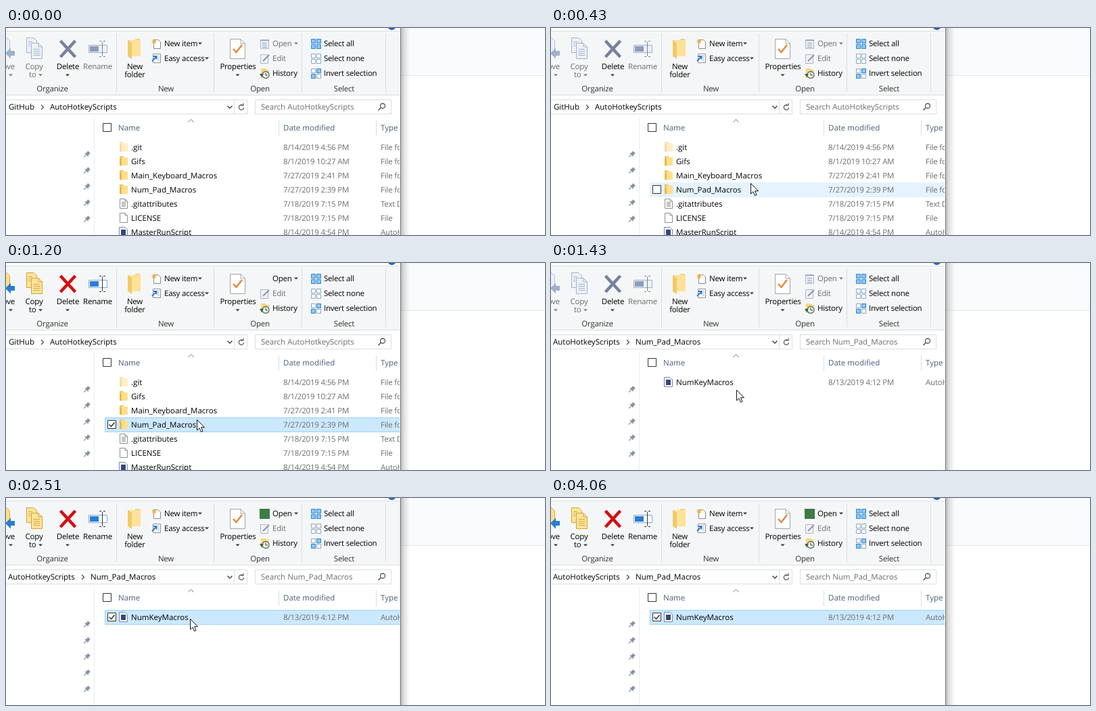
An HTML page that plays this animation: 797x307 px, repeating every 4130 ms.

```html
<!DOCTYPE html>
<html lang="en">
<head>
<meta charset="utf-8">
<title>File window</title>
<style>
  html, body { margin: 0; width: 100%; height: 100%; overflow: hidden; background: #fff; }
  svg { display: block; width: 797px; height: 307px; }
  text { font: 11.5px "Open Sans", "Noto Sans", sans-serif; text-rendering: geometricPrecision; fill: #000; white-space: pre; }
  .ribbon text { letter-spacing: -.22px; }
  .ribbon .mid { text-anchor: middle; }
  .ribbon .dim, .ribbon .off text { fill: #6d6d6d; }
  .ribbon .group { text-anchor: middle; fill: #333; }
  .head text { fill: #4a6079; }
  .list .info, .hint { fill: #6d6d6d; }
  .list .info { letter-spacing: -.2px; }
  .line { fill: none; stroke: #dcdddf; }

  .cursor, .mark, .tick, .click, .first, .second, .on, .off, .edge, .script {
    animation: 4130ms step-end infinite;
  }
  .cursor { animation-name: cursor; }
  .mark { animation-name: mark; }
  .tick { animation-name: tick; }
  .click { animation-name: click; }
  .first { animation-name: first; }
  .second { animation-name: second; }
  .on { animation-name: on; }
  .off { animation-name: off; }
  .script { animation-name: script; }
  .edge { animation-name: edge; }

  @keyframes cursor {
    0% { transform: translate(850px, 350px); }
    1.69% { transform: translate(629px, 293px); }
    3.38% { transform: translate(562px, 260px); }
    5.32% { transform: translate(474px, 232px); }
    7.02% { transform: translate(392px, 214px); }
    8.71% { transform: translate(330px, 219px); }
    10.41% { transform: translate(295px, 230px); }
    12.34% { transform: translate(287px, 235px); }
    14.28% { transform: translate(283px, 237px); }
    28.81% { transform: translate(282px, 232px); }
    30.75% { transform: translate(280px, 221px); }
    32.68% { transform: translate(277px, 205px); }
    34.62% { transform: translate(274px, 188px); }
    36.56% { transform: translate(272px, 179px); }
    69.97% { transform: translate(304px, 189px); }
    71.67% { transform: translate(462px, 228px); }
    73.6% { transform: translate(696px, 287px); }
    75.54%, 100% { transform: translate(850px, 350px); }
  }
  @keyframes mark {
    0% { opacity: 0; transform: translateY(84px); fill: #e5f3ff; stroke: #e5f3ff; }
    3.38% { opacity: 1; transform: translateY(84px); fill: #e5f3ff; stroke: #e5f3ff; }
    5.32% { opacity: 1; transform: translateY(63px); fill: #e5f3ff; stroke: #e5f3ff; }
    7.02% { opacity: 1; transform: translateY(42px); fill: #e5f3ff; stroke: #e5f3ff; }
    10.41% { opacity: 1; transform: translateY(63px); fill: #e5f3ff; stroke: #e5f3ff; }
    21.54% { opacity: 1; transform: translateY(63px); fill: #cce8ff; stroke: #99d1ff; }
    30.75% { opacity: 0; transform: none; fill: #e5f3ff; stroke: #e5f3ff; }
    36.56% { opacity: 1; transform: none; fill: #e5f3ff; stroke: #e5f3ff; }
    47.69% { opacity: 1; transform: none; fill: #cce8ff; stroke: #99d1ff; }
    71.67% { opacity: 1; transform: none; fill: #d9d9d9; stroke: #d9d9d9; }
    98.3%, 100% { opacity: 1; transform: none; fill: #cce8ff; stroke: #99d1ff; }
  }
  @keyframes tick {
    0%, 30.75% { opacity: 0; }
    21.54%, 47.69%, 100% { opacity: 1; }
  }
  @keyframes click {
    0%, 23.24%, 27.11%, 51.33%, 58.83%, 100% { opacity: 0; }
    21.54%, 25.66%, 47.69%, 55.2% { opacity: .82; }
  }
  @keyframes first { 0% { opacity: 1; } 30.75%, 100% { opacity: 0; } }
  @keyframes second { 0% { opacity: 0; } 30.75%, 100% { opacity: 1; } }
  @keyframes on { 0%, 30.75% { opacity: 0; } 27.11%, 49.39%, 100% { opacity: 1; } }
  @keyframes off { 0%, 30.75% { opacity: 1; } 27.11%, 49.39%, 100% { opacity: 0; } }
  @keyframes script { 0% { opacity: 0; } 49.39%, 100% { opacity: 1; } }
  @keyframes edge { 0%, 98.3%, 100% { stroke: #f4f4f4; } 60.77% { stroke: #e0e0e0; } }
</style>
</head>
<body>
<svg viewBox="0 0 797 307" xmlns="http://www.w3.org/2000/svg">
  <defs>
    <clipPath id="win"><path d="M0 0H582V307H0z"/></clipPath>
    <linearGradient id="shade">
      <stop offset="0" stop-color="#000" stop-opacity=".28"/>
      <stop offset=".4" stop-color="#000" stop-opacity=".12"/>
      <stop offset="1" stop-color="#000" stop-opacity="0"/>
    </linearGradient>
    <path id="caret" d="M-3-1.5H3L0 1.5z"/>
    <path id="chev" d="M-2-3.5L1.5 0L-2 3.5" fill="none" stroke="#444" stroke-width="1.2"/>
    <g id="folder">
      <path d="M1 0H6L7.5 2H12V14H1z" fill="#f0c75e"/>
      <path d="M3 2H13V14H3z" fill="#ffdf8c"/>
      <path d="M1 2.5L4 4V15L1 13.5z" fill="#e9b949"/>
    </g>
    <path id="page" d="M1.5.5H9L12.5 4V14.5H1.5zM9 .5V4H12.5" fill="#fff" stroke="#8b8f94"/>
    <g id="code">
      <path d="M.5.5H9L12.5 4V14.5H.5z" fill="#fff" stroke="#7085ab"/>
      <path d="M3 4H10V12H3z" fill="#34487f"/>
    </g>
    <g id="pin" fill="#8591a3">
      <path d="M1-5L5-1L3.8-.6L1.8 1.5L1.7 4L-3.8-1.6L-1.3-1.7L.7-3.8z"/>
      <path d="M-1.5 1L-4.7 4.7" stroke="#8591a3" stroke-width="1.2"/>
    </g>
    <g id="pages">
      <path d="M.5.5H11L15.5 5V22.5H.5z"/>
      <path d="M7.5 8.5H18L23.5 14V31.5H7.5z"/>
      <path d="M18 8.5V14H23.5M10.5 17.5H20M10.5 20.5H20.5M10.5 23.5H20.5M10.5 26.5H20.5M3 6.5H9M3 9.5H6M3 12.5H6" fill="none"/>
    </g>
    <path id="cross" d="M-11-12L11 12M11-12L-11 12" fill="none" stroke-width="4.6"/>
    <path id="sheet" d="M-8 14.5H1L5.5 19V38.5H-8z"/>
    <path id="arrow" d="M-1 37.5L7 29.5V34H13V41H7V45.5z"/>
    <path id="beam" d="M138 19.500H141M144 19.500H147M138 42.500H141M144 42.500H147M142.500 20.500V41.500" fill="none"/>
    <path id="grid" d="M.5.5H6.5V6.5H.5zM8.5.5H14.5V6.5H8.5zM.5 8.5H6.5V14.5H.5zM8.5 8.5H14.5V14.5H8.5z"/>
    <path id="box" d="M.5.5H12.5V12.5H.5z" fill="#fff" stroke="#333"/>
  </defs>

  <!-- page behind the window -->
  <path d="M0 0H797V307H0z" fill="#fff"/>
  <path d="M583 0H797V70H583z" fill="#fafbfc"/>
  <path d="M583 70.5H797" stroke="#e5e7ea"/>
  <path d="M583 0H597V307H583z" fill="url(#shade)"/>

  <g clip-path="url(#win)">
    <path d="M0 0H583V307H0z" fill="#fff"/>

    <g class="ribbon">
      <path d="M0 4H583V99H0z" fill="#f5f6f7"/>
      <path class="line" d="M0 4.5H583M0 99.5H583M163.5 8V95M307.5 8V95M437.5 8V95M561.5 8V95"/>
      <circle cx="570.5" cy="-3" r="6" fill="#2466b5"/>

      <text x="68.5" y="94" class="group">Organize</text>
      <text x="236.5" y="94" class="group">New</text>
      <text x="375.5" y="94" class="group">Open</text>
      <text x="500" y="94" class="group">Select</text>

      <g class="off">
        <use href="#sheet" fill="#edf1f7" stroke="#b3c0d6"/>
        <use href="#arrow" fill="#9fb0cd"/>
        <use href="#pages" x="30" y="14" fill="#edf1f7" stroke="#a3b2cc"/>
        <use href="#cross" x="91.5" y="31" stroke="#76829f"/>
        <path d="M122.500 25.500H149.500V36.500H122.500z" fill="#eef0f4" stroke="#9fb0cd"/>
        <path d="M124 27H137V35H124z" fill="#8c9dbd"/>
        <use href="#beam" stroke="#76829f"/>
        <text x="13" y="61" text-anchor="end">Move</text>
        <text x="41.5" y="61" class="mid">Copy</text>
        <text x="34" y="73">to</text>
        <text x="135.5" y="61" class="mid">Rename</text>
        <use href="#caret" x="7" y="70" fill="#777"/>
        <use href="#caret" x="51" y="70" fill="#777"/>
      </g>
      <g class="on">
        <use href="#sheet" fill="#ffe08a" stroke="#d8ab43"/>
        <use href="#arrow" fill="#2b7cd3"/>
        <use href="#pages" x="30" y="14" fill="#ffe59a" stroke="#cfa23c"/>
        <use href="#cross" x="91.5" y="31" stroke="#d20f14"/>
        <path d="M122.500 25.500H149.500V36.500H122.500z" fill="#fff" stroke="#7fa9d6"/>
        <path d="M124 27H137V35H124z" fill="#2b7cd3"/>
        <use href="#beam" stroke="#333"/>
        <text x="13" y="61" text-anchor="end">Move</text>
        <text x="41.5" y="61" class="mid">Copy</text>
        <text x="34" y="73">to</text>
        <text x="135.5" y="61" class="mid">Rename</text>
        <use href="#caret" x="7" y="70" fill="#333"/>
        <use href="#caret" x="51" y="70" fill="#333"/>
      </g>
      <text x="91.5" y="61" class="mid">Delete</text>
      <use href="#caret" x="91" y="70" fill="#333"/>

      <path d="M180 18H190L192 16H198V42H180z" fill="#f3d27b"/>
      <path d="M182 18H199V42H182z" fill="#ffe299"/>
      <path d="M180 18L186 22V46L180 42z" fill="#f0ca68"/>
      <text x="190.5" y="61" class="mid">New</text>
      <text x="190.5" y="73" class="mid">folder</text>
      <path d="M218.5 17.5H225L228.5 21V30.5H218.5z" fill="#fff" stroke="#888"/>
      <path d="M215.500 20H222.500M219 16.500V23.500M216.500 17.500L221.500 22.500M221.500 17.500L216.500 22.500" stroke="#eeb13c" stroke-width="1.200"/>
      <text x="234" y="27">New item</text>
      <use href="#caret" x="287" y="23" fill="#333"/>
      <path d="M217.5 38.5H228.5V51.5H217.5z" fill="#fff" stroke="#8b9199"/>
      <path d="M223 41.500H227M224 44.500H227M224 47.500H227" stroke="#a3abb5"/>
      <path d="M216 49L222 43M218 42H222.5V46.5" stroke="#2379c9" stroke-width="1.8" fill="none"/>
      <text x="234" y="49">Easy access</text>
      <use href="#caret" x="297" y="45" fill="#333"/>

      <path d="M331.5 16.5H347L353.5 23V45.5H331.5z" fill="#fff" stroke="#a0a4a9"/>
      <path d="M347 16.5V23H353.5" fill="none" stroke="#a0a4a9"/>
      <path d="M336 31L340.5 36L349 25" fill="none" stroke="#ea8434" stroke-width="2.4"/>
      <text x="343" y="61" class="mid">Properties</text>
      <use href="#caret" x="342.5" y="70" fill="#333"/>

      <g class="off">
        <path d="M376.5 17.5H388.5V30.5H376.5z" fill="#eef1f6" stroke="#a9b6cc"/>
        <path d="M376 18.500H389M379 22.500H386M379 25.500H386M379 28.500H386" stroke="#8c9dbd"/>
        <text x="394" y="27">Open</text>
        <use href="#caret" x="429" y="23" fill="#777"/>
      </g>
      <g class="on">
        <text x="394" y="27">Open</text>
        <use href="#caret" x="429" y="23" fill="#333"/>
      </g>
      <path class="script" d="M375 16H390V31H375z" fill="#3c7c45"/>
      <path d="M376.5 39.5H387.5V52.5H376.5z" fill="#f1f2f5" stroke="#a9b6cc"/>
      <path d="M380 49L389 40" stroke="#8793ab" stroke-width="2"/>
      <text x="394" y="49" class="dim">Edit</text>
      <path d="M377 60H384L386 62H389V74H377z" fill="#f5d87f"/>
      <circle cx="384" cy="69.5" r="5" fill="#f4f6f4" stroke="#5d6b60" stroke-width="1.3"/>
      <path d="M384 66.500V70H387" fill="none" stroke="#333"/>
      <path d="M375 68L381 68L378 73z" fill="#2f6b34"/>
      <text x="394" y="71">History</text>

      <use href="#grid" x="451" y="16" fill="#8ec7f3" stroke="#2f86cf"/>
      <use href="#grid" x="451" y="38" fill="#fff" stroke="#8aa6c2"/>
      <use href="#grid" x="451" y="60" fill="#fff" stroke="#8aa6c2"/>
      <path d="M459.5 60.5H465.5V66.5H459.5zM451.5 68.5H457.5V74.5H451.5z" fill="#8ec7f3" stroke="#2f86cf"/>
      <text x="470" y="27">Select all</text>
      <text x="470" y="49">Select none</text>
      <text x="470" y="71">Invert selection</text>
    </g>

    <!-- address and search -->
    <path class="line" d="M-1 106.5H356.5V127.5H-1M337.5 107V127M368.5 106.5H569.5V127.5H368.5z"/>
    <path d="M327.5 115.5L331 119L334.5 115.5" fill="none" stroke="#444" stroke-width="1.5"/>
    <path d="M350 114.500A3.700 3.700 0 1 0 351.700 118M351 111.500V115H347.500" fill="none" stroke="#555" stroke-width="1.2"/>
    <circle cx="557" cy="115.5" r="3.5" fill="none" stroke="#555" stroke-width="1.3"/>
    <path d="M554.5 118L550.5 122" stroke="#555" stroke-width="1.7"/>
    <g class="first">
      <text x="4" y="121">GitHub</text>
      <use href="#chev" x="54" y="117.5"/>
      <text x="65" y="121">AutoHotkeyScripts</text>
      <text x="377" y="121" class="hint">Search AutoHotkeyScripts</text>
    </g>
    <g class="second">
      <text x="3" y="121">AutoHotkeyScripts</text>
      <use href="#chev" x="114" y="117.5"/>
      <text x="125" y="121">Num_Pad_Macros</text>
      <text x="377" y="121" class="hint">Search Num_Pad_Macros</text>
    </g>

    <!-- side pane and column heads -->
    <path d="M130.5 133V307" stroke="#ececec"/>
    <use href="#pin" x="120" y="187"/>
    <use href="#pin" x="120" y="211"/>
    <use href="#pin" x="120" y="235"/>
    <use href="#pin" x="120" y="259"/>
    <use href="#pin" x="120" y="283"/>
    <path class="line" d="M403.5 137V160M547.5 137V160"/>
    <path d="M269.5 139.5L273.5 135.5L277.5 139.5" fill="none" stroke="#777"/>
    <use href="#box" x="143" y="141"/>
    <g class="head">
      <text x="166" y="152">Name</text>
      <text x="410" y="152">Date modified</text>
      <text x="554" y="152">Type</text>
    </g>

    <g class="mark">
      <path d="M146.5 166.5H590V187.5H146.5z"/>
      <use href="#box" x="150" y="170"/>
      <path class="tick" d="M152.5 176.5L155.5 179.5L160.5 173.5" fill="none" stroke="#222" stroke-width="1.3"/>
    </g>

    <g class="list first" id="folderList"></g>
    <g class="list second" id="scriptList"></g>
  </g>

  <path class="edge" d="M582.5 0V307" stroke="#f4f4f4"/>
  <path d="M583.5 0V307" stroke="#7a7a7a"/>

  <g class="cursor">
    <circle class="click" cx="1" cy="1" r="10" fill="#f3ee48"/>
    <path d="M.5.5V16L4 12.7L6.5 18.5L9 17.4L6.5 11.7H11.5z" fill="#fff" stroke="#111"/>
  </g>
</svg>
<script>
  const svgNS = "http://www.w3.org/2000/svg";

  function add(parent, tag, attrs, label) {
    const el = document.createElementNS(svgNS, tag);
    for (const key in attrs) el.setAttribute(key, attrs[key]);
    if (label) el.textContent = label;
    parent.append(el);
    return el;
  }

  function fillList(id, rows) {
    const list = document.getElementById(id);
    rows.forEach(([icon, name, date, type], i) => {
      const y = 181 + 21 * i;
      const pic = add(list, "use", { href: "#" + icon, x: 167, y: y - 12 });
      if (name === ".git") pic.setAttribute("opacity", .5);
      if (type === "Text Document") {
        add(list, "path", { d: `M171 ${y - 6.5}h6m-6 2h6m-6 2h6m-6 2h6`, stroke: "#8b8f94" });
      }
      add(list, "text", { x: 185, y }, name);
      add(list, "text", { x: 410, y, class: "info" }, date);
      add(list, "text", { x: 554, y, class: "info" }, type);
    });
  }

  fillList("folderList", [
    ["folder", ".git", "8/14/2019 4:56 PM", "File folder"],
    ["folder", "Gifs", "8/1/2019 10:27 AM", "File folder"],
    ["folder", "Main_Keyboard_Macros", "7/27/2019 2:41 PM", "File folder"],
    ["folder", "Num_Pad_Macros", "7/27/2019 2:39 PM", "File folder"],
    ["page", ".gitattributes", "7/18/2019 7:15 PM", "Text Document"],
    ["page", "LICENSE", "7/18/2019 7:15 PM", "File"],
    ["code", "MasterRunScript", "8/14/2019 4:54 PM", "AutoHotkey Script"]
  ]);
  fillList("scriptList", [
    ["code", "NumKeyMacros", "8/13/2019 4:12 PM", "AutoHotkey Script"]
  ]);
</script>
</body>
</html>
```
